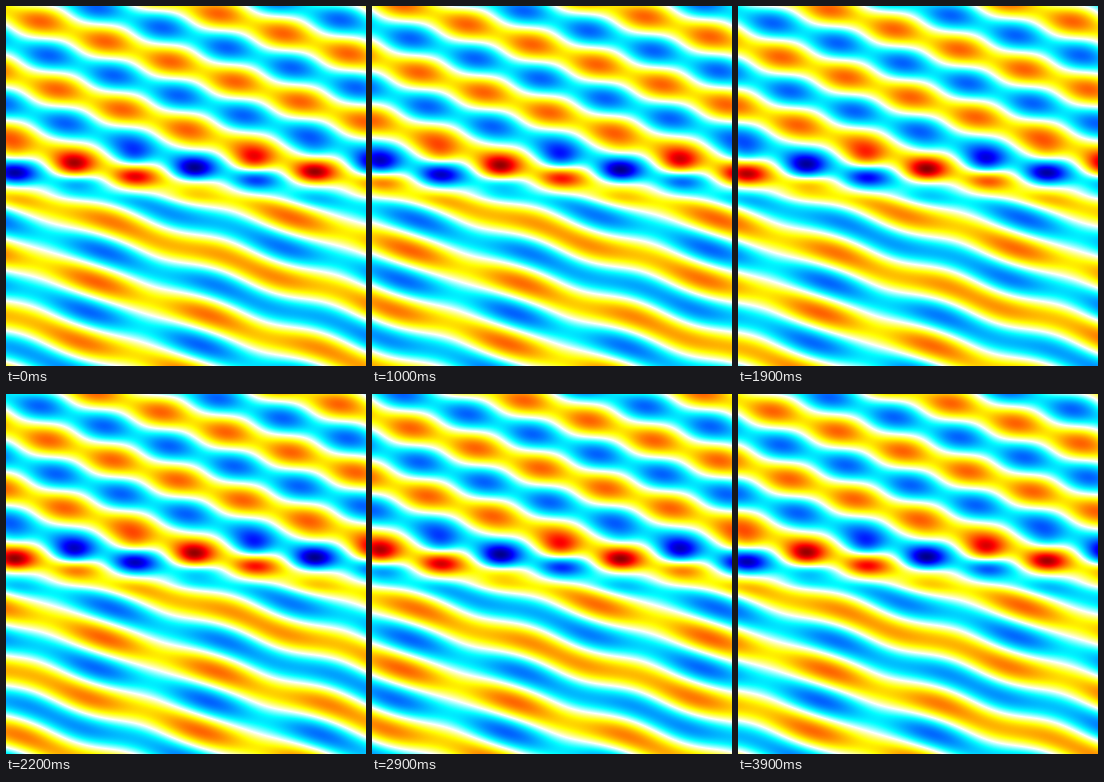
Recreate the animation shown at these times as a matplotlib script. Size 360x360 px, loop 4000 ms.

```python
import numpy as np
import matplotlib.pyplot as plt
from matplotlib.animation import FuncAnimation
from matplotlib.colors import LinearSegmentedColormap

SIZE = 360
FRAMES = 40
PITCH = 60                      # grating period, equal to the wavelength
K = 2 * np.pi / PITCH
SIN = 0.295                     # sine of the angle of incidence

KX0 = K * SIN
KX1 = KX0 - K                   # first diffracted order
KY0 = np.sqrt(K**2 - KX0**2)
KY1 = np.sqrt(K**2 - KX1**2)

x, y = np.meshgrid(np.arange(SIZE), np.arange(SIZE))


def wave(amp, kx, ky, deg):
    return amp * np.exp(1j * (kx * x + ky * y + np.radians(deg)))


def hot_spots(amp, x0, y0, deg):
    """Focused field beside each rod, with the phase step of the grating."""
    sigma_y = np.where(y < y0, 14, 11)
    profile = np.exp(-((y - y0) / sigma_y) ** 2 / 2)
    row = 0
    for n in range(-1, 8):
        bump = np.exp(-((x - x0 - n * PITCH) / 13) ** 2 / 2)
        row = row + bump * np.exp(1j * KX0 * n * PITCH)
    return amp * profile * row * np.exp(1j * (np.radians(deg) - KY0 * y))


def total_field():
    above = wave(0.43, KX0, -KY0, 26) + wave(0.13, KX1, -KY1, -154)
    below = (wave(0.42, KX0, -KY0, -19)
             + wave(0.06, KX0, KY0, 68)
             + wave(0.08, KX1, KY1, -70))
    mix = 1 / (1 + np.exp(-(y - 187) / 4))
    shadow = 1 - 0.35 * np.exp(-((y - 184) / 9) ** 2)
    base = (above * (1 - mix) + below * mix) * shadow
    return base + hot_spots(0.5, 7, 162, 86)


FIELD = total_field()

cmap = LinearSegmentedColormap.from_list("wave", [
    (0, (0, 0, 0.5)), (0.125, (0, 0, 1)), (0.375, (0, 1, 1)),
    (0.5, (1, 1, 1)),
    (0.625, (1, 1, 0)), (0.875, (1, 0, 0)), (1, (0.5, 0, 0)),
], N=512)


def snapshot(frame):
    return np.real(FIELD * np.exp(-2j * np.pi * frame / FRAMES))


fig = plt.figure(figsize=(3.6, 3.6), dpi=100)
ax = fig.add_axes([0, 0, 1, 1])
ax.axis("off")
image = ax.imshow(snapshot(0), cmap=cmap, vmin=-1, vmax=1,
                  interpolation="nearest", aspect="auto")


def update(frame):
    image.set_data(snapshot(frame))
    return (image,)


anim = FuncAnimation(fig, update, frames=FRAMES, interval=100,
                     repeat=True, repeat_delay=0, blit=False)
plt.show()
```
